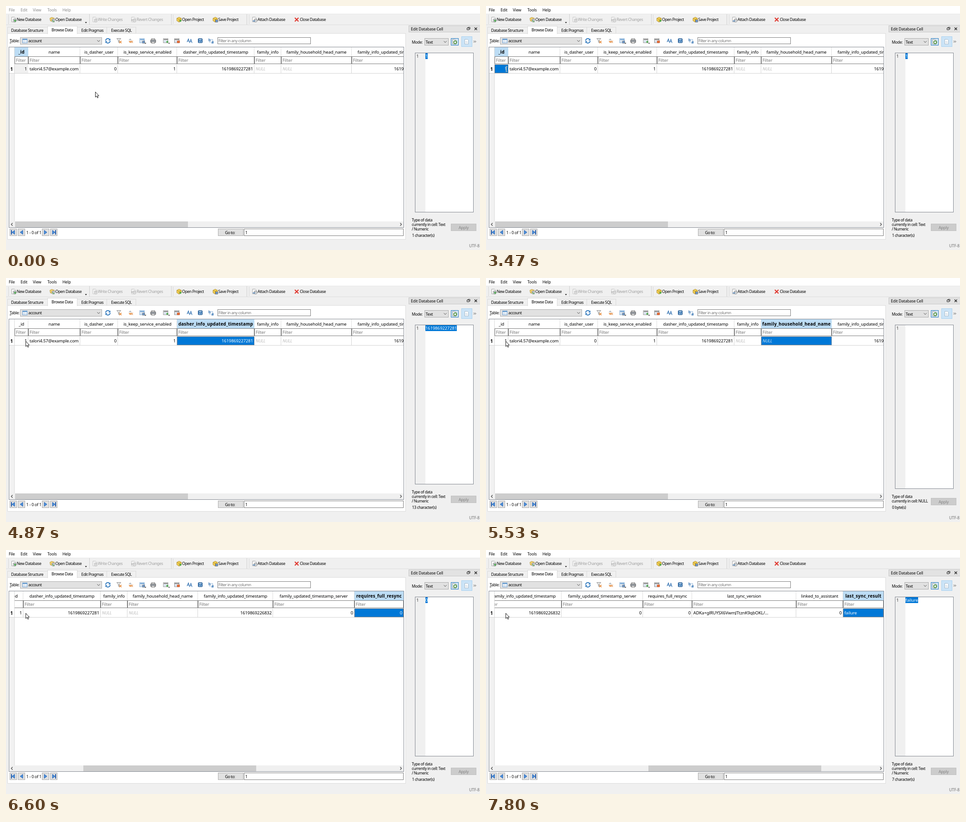
An HTML page that plays this animation: 1042x538 px, repeating every 8000 ms.

```html
<!DOCTYPE html>
<html lang="en">
<head>
<meta charset="utf-8">
<title>Database table browser</title>
<style>
  html, body { margin: 0; width: 100%; height: 100%; overflow: hidden; background: #f0f0f0; }
  svg { display: block; width: 1042px; height: 538px; }
  text { font-family: "Noto Sans", "Open Sans", sans-serif; white-space: pre; }
  .ui { font-size: 8.8px; letter-spacing: -.48px; }
  .title { font-size: 8.8px; letter-spacing: -.2px; }
  .cell { font-size: 9.5px; letter-spacing: -.12px; }
  .bold { font-size: 9.7px; letter-spacing: .22px; font-weight: 700; }
  .null { font-size: 9.2px; letter-spacing: -.12px; font-style: italic; }
</style>
</head>
<body>
<svg id="stage" viewBox="0 0 1042 538" xmlns="http://www.w3.org/2000/svg">
  <defs><clipPath id="view"><rect x="19" y="91" width="855" height="384"/></clipPath></defs>
  <g id="chrome"></g><g id="menu"></g><g id="grid"></g><g id="dock"></g><g id="pointer"></g>
</svg>
<script>
const $ = id => document.getElementById(id);
const BLUE = '#0078d7', GREY = '#757575', EDGE = '#828790', HEAD = '#bcdcf4';

const fill = (x, y, w, h, c) =>
  `<rect x="${x}" y="${y}" width="${w}" height="${h}" fill="${c}" shape-rendering="crispEdges"/>`;
const box = (x, y, w, h, c, edge, extra = '') =>
  `<rect x="${x + .5}" y="${y + .5}" width="${w - 1}" height="${h - 1}" fill="${c}" stroke="${edge}" ${extra}/>`;
const path = (d, c = 'none', line = 'none', width = 1) =>
  `<path d="${d}" fill="${c}" stroke="${line}" stroke-width="${width}"/>`;
const label = (s, x, y, c = '#000', cls = 'ui', anchor = 'start') =>
  `<text x="${x}" y="${y}" fill="${c}" class="${cls}" text-anchor="${anchor}">${s}</text>`;
const at = (x, y, s) => `<g transform="translate(${x} ${y})">${s}</g>`;
const chevron = (x, y) => path(`M${x} ${y}l3 3 3-3`, 'none', '#444');

// Icons, drawn in a 12 px box
const sheet = (edge, c) => path('M1.5 .5h6l2 2v8.500h-8z', c, edge, .8);
const drum = (c, edge) => path('M5 5.500v4.500c0 2 6 2 6 0v-4.500c0-2-6-2-6 0c0 1.600 6 1.600 6 0', c, edge, .7);
const folder = path('M.5 3l4-2 6 2-2 7-7-1z', '#f3d36b', '#b08a25', .8);
const cube = path('M6 .6l5 2.500v5.500l-5 3-5-3v-5.500z', '#f2cf52', '#a8862a', .8) +
  path('M1 3l5 2.500 5-2.500M6 5.500v6', 'none', '#a8862a', .7);
const plus = path('M9 6v5M6.500 8.500h5', 'none', '#3fa33f', 1.6);
const table = (c = '#6d9fd0') => box(0, 1, 11, 10, '#fff', c) + fill(1, 2, 9, 2, c) +
  path('M1 6.500h9M1 8.500h9M4 4v6', 'none', '#b8cfe6', .8);
const badge = c => box(6, 6, 6, 6, c, '#555', 'stroke-width=".7"');
const drop = path('M11 11h4l-2 2z', '#222');

function drawChrome() {
  let s = fill(0, 0, 1042, 538, '#f0f0f0') + fill(0, 0, 1042, 17, '#fff') +
    fill(0, 17, 1042, 1, '#e6e6e6') + fill(0, 41, 1042, 1, '#dcdcdc');

  for (const x of [5, 367, 534])
    for (let y = 20; y < 40; y += 3) s += fill(x, y, 1, 1, '#a8a8a8');
  for (const x of [183, 363, 529]) s += fill(x, 18, 1, 23, '#cfcfcf');

  const tools = [
    ['New Database', 23.500, sheet('#909090', '#fff') + drum('#d5d9dc', '#777') + plus],
    ['Open Database', 108.500, folder + drum('#d5d9dc', '#777') + path('M6 8l4 3', 'none', '#3fa33f', 1.4)],
    ['Write Changes', 202, sheet('#bbb', '#f4f4f4') + drum('#ddd', '#b0b0b0'), 1],
    ['Revert Changes', 287, sheet('#bbb', '#f4f4f4') + drum('#ddd', '#b0b0b0') + path('M5 7H1l2-2M1 7l2 2', 'none', '#aaa'), 1],
    ['Open Project', 387, cube + plus],
    ['Save Project', 466.500, cube + badge('#6f9bd0')],
    ['Attach Database', 553, sheet('#909090', '#fff') + drum('#d5d9dc', '#777') + path('M2 9h5', 'none', '#3b79b8', 1.6)],
    ['Close Database', 646, path('M1.500 2l8 8M9.500 2l-8 8', 'none', '#e03a32', 2.4)]
  ];
  for (const [name, x, icon, off] of tools)
    s += at(x - 12.500, 24, icon) + label(name, x, 33, off ? '#a0a0a0' : '#000');
  s += path('M173.500 35.500h4.500l-2.200 2.500z', '#111');

  // Tabs and page
  s += box(3, 60, 876, 455, '#fff', '#dcdcdc');
  for (const [x, w] of [[3, 89], [156, 66], [221, 65]]) s += box(x, 46, w, 15, '#f0f0f0', '#d9d9d9');
  s += box(91, 44, 66, 18, '#fff', '#d9d9d9') + fill(92, 60, 64, 3, '#fff');
  s += label('Database Structure', 11, 57) + label('Browse Data', 100, 56) +
    label('Edit Pragmas', 165.500, 57) + label('Execute SQL', 231, 57);

  s += label('<tspan text-decoration="underline">T</tspan>able:', 8, 80) +
    box(31, 69, 180, 16, '#e1e1e1', '#adadad') + at(36, 71, table()) + label('account', 49, 80) + chevron(200.500, 75.500);

  const funnel = path('M.5 1h9l-3.500 4.500v5l-2-1.500v-3.500z', '#e8e8e8', '#777', .8);
  const icons = [
    [218, path('M1 6a5 5 0 0 1 8.500-3.200M11 6.500a5 5 0 0 1-8.500 3.200', 'none', '#2f78bd', 1.9) +
      path('M11.500 1v4.500h-4.500zM.5 11.500v-4.500h4.500z', '#2f78bd')],
    [243, funnel + path('M6 6.500l5 5M11 6.500l-5 5', 'none', '#e58a3a', 1.6)],
    [268, path('M1.500 5l3.500-4 3.500 4z', '#b9bec3') + path('M1.500 7l3.500 4 3.500-4z', '#e58a3a') +
      path('M7 6l4 5M11 6l-4 5', 'none', '#dd8740', 1.1)],
    [293.500, table() + badge('#6f9bd0') + drop],
    [317.500, box(2, 1, 8, 4, '#fff', '#666') + box(0, 4, 12, 6, '#a3aab1', '#555') + box(2, 8, 8, 4, '#fff', '#666')],
    [345.500, table('#888') + plus + drop],
    [370, table('#888') + box(6, 6, 6, 5, '#f0763a', '#c44c20')],
    [397.500, path('M.5 9l3-7 2 7M1.500 7h4M6 11l3-8 2.500 8M7 8h4', 'none', '#2f6fb0', 1.2)],
    [421, box(1, 1, 10, 10, '#3476b4', '#1f5288', 'rx="1"') + path('M3 4h6M3 8.500h2.500M7 8.500h2', 'none', '#fff', 1.5)],
    [444.500, path('M1.500 1v5.500h3v-3h-3M8 7.500h3v4h-3v-2.200h3', 'none', '#2f6fb0', 1.2) +
      path('M6 3.500h4v2.500M2 9h3.500', 'none', '#8ab0d5', 1)]
  ];
  for (const [x, icon] of icons) s += at(x, 70.500, icon);
  s += box(465, 69, 205, 15, '#fff', '#7a7a7a') + label('Filter in any column', 467, 80, GREY);

  // Paging row
  [[8, -1, 1], [26, -1], [79, 1], [97, 1, 1]].forEach(([x, dir, end]) => {
    const c = x + 8;
    s += box(x, 491, 16, 16, '#e1e1e1', '#adadad') +
      path(`M${c + 3 * dir} 499l${-6 * dir}-4.500v9z`, '#4a90dd', '#1f58a8', .8);
    if (end) s += fill(c + 4 * dir - 1, 494, 2, 10, '#1f58a8');
  });
  s += label('1 - 0 of 1', 44.500, 503, '#000', 'title') + box(466, 491, 56, 16, '#e1e1e1', '#adadad') +
    label('Go to:', 481.500, 503) + box(523, 491, 351, 16, '#fff', '#7a7a7a') + label('1', 526, 502.500);
  s += label('UTF-8', 1018, 532, '#6d6d6d', 'title');

  // Side panel head
  s += box(885, 43, 160, 15, '#e2e2e2', '#c6c6c6') + label('Edit Database Cell', 890, 54, '#000', 'title') +
    path('M1015.500 48.500v-1.500h4.500v4h-1.500M1013.500 48.500h4.500v4h-4.500z', 'none', '#222') +
    path('M1030 47.500l5.500 5.500M1035.500 47.500l-5.500 5.500', 'none', '#222', 1.4);
  s += label('Mode:', 892, 83) + box(920, 71, 53, 16, '#e1e1e1', '#adadad') + label('Text', 922.500, 82.500, '#000', 'title') +
    chevron(962.500, 77.500);
  s += box(978, 71, 17, 16, '#d5e7f5', '#2b7cc0') + at(980, 73, sheet('#77848f', '#eef2f5') +
    '<circle cx="7.500" cy="7" r="3.200" fill="none" stroke="#5d9a48" stroke-width="2"/>');
  s += box(1001, 67, 24, 23, '#cce4f7', '#a9d1f0') + at(1007, 73, sheet('#93a9bd', '#fff') +
    path('M3 4.500h4M3 6.500h5M3 8.500h5', 'none', '#c3d0dc', .8));
  s += path('M1028 76.500l2 2-2 2M1031 76.500l2 2-2 2', 'none', '#333', .9);
  $('chrome').innerHTML = s;
}

// Column name, right edge, value, left aligned
const columns = [
  ['_id', 49, '1'],
  ['name', 163, 'talori4.57@example.com', 1],
  ['is_dasher_user', 246, '0'],
  ['is_keep_service_enabled', 376, '1'],
  ['dasher_info_updated_timestamp', 546, '1619869227281'],
  ['family_info', 605, null],
  ['family_household_head_name', 760, null],
  ['family_info_updated_timestamp', 925, '1619869226832'],
  ['family_updated_timestamp_server', 1104, '0'],
  ['requires_full_resync', 1212, '0'],
  ['last_sync_version', 1441, 'ADKa+glRUYSX6VwmJTtznK9qbOKL/zTRKUp6i77FsCk=', 1],
  ['linked_to_assistant', 1544, '0'],
  ['last_sync_result', 1633, 'failure', 1]
];
const LEFT = 19, RIGHT = 874, TOTAL = 1894;

function drawGrid(col, active, edit) {
  const scroll = Math.max(0, columns[col][1] - RIGHT);
  let cells = '', x0 = LEFT - scroll;
  columns.forEach(([name, right, value, left], i) => {
    const x1 = right - scroll, w = x1 - x0, on = i === col, lit = on && active;
    if (x1 > LEFT && x0 < RIGHT) {
      cells += fill(x1 - 1, 91, 1, 20, '#dedede') + fill(x1 - 1, 129, 1, 20, '#d4d4d4') + fill(x0, 148, w, 1, '#d4d4d4');
      if (on) cells += fill(x0, 91, w, 20, HEAD) + fill(x0, 129, w, 19, active ? BLUE : '#f0f0f0');
      if (lit) cells += box(x0, 129, w, 19, 'none', '#5d7d99');
      cells += label(name, (x0 + x1) / 2, 105.300, '#000', on ? 'bold' : 'cell', 'middle') +
        box(x0, 111, w, 17, '#fff', '#7a7a7a') + label('Filter', x0 + 2.700, 122.600, GREY, 'cell');
      const ink = lit ? '#fff' : '#000';
      if (value === null) cells += label('NULL', x0 + 3, 142.300, lit ? '#d6e8f7' : '#b8b8b8', 'null');
      else if (!(on && edit)) {
        const shown = value.length > 40 ? value.slice(0, 29) + '...' : value;
        cells += left ? label(shown, x0 + 2.700, 142.300, ink, 'cell')
          : label(shown, x1 - 3, 142.300, ink, 'cell', 'end');
      }
    }
    x0 = x1;
  });
  if (edit) {
    cells += box(19, 129, 30, 19, '#fff', BLUE);
    if (edit.marked) cells += fill(21, 133, 6, 12, BLUE);
    cells += label('1', 21.700, 142.300, edit.marked ? '#fff' : '#000', 'cell');
    if (edit.caret) cells += fill(27, 133, 1, 12, '#000');
  }
  const thumb = 20 + scroll / (TOTAL - 855) * 462;
  $('grid').innerHTML = box(6, 90, 869, 399, '#fff', EDGE) +
    fill(7, 149, 11, 326, '#f2f2f2') + fill(18, 91, 1, 384, '#d9d9d9') + fill(7, 148, 12, 1, '#d4d4d4') +
    label('1', 9.500, 142.500, '#000', 'bold') + `<g clip-path="url(#view)">${cells}</g>` +
    fill(7, 475, 867, 13, '#f0f0f0') + fill(Math.round(thumb), 475, 380, 13, '#cdcdcd') +
    path('M14.500 478.500l-3 3 3 3M866.500 478.500l3 3-3 3', 'none', '#444', 1.3);
}

function drawDock(value) {
  const none = value === null, text = value || '', n = text.length;
  const cuts = n > 40 ? [0, 17, 35, n] : n > 20 ? [0, n - 1, n] : [0, n];
  const bottom = none ? 465 : 455;
  let s = box(899, 103, 129, bottom - 103, '#fff', EDGE) + fill(900, 104, 22, bottom - 105, '#f0f0f0') +
    label('1', 902, 114.300, '#333', 'cell');
  $('dock').innerHTML = s;
  for (let i = 0; n && i < cuts.length - 1; i++) {
    const y = 104 + i * 13, line = text.slice(cuts[i], cuts[i + 1]);
    $('dock').insertAdjacentHTML('beforeend', label(line, 922, y + 10.300, '#fff', 'cell'));
    const ink = $('dock').lastElementChild;
    ink.insertAdjacentHTML('beforebegin', fill(922, y, Math.round(ink.getComputedTextLength()), 13, BLUE));
    if (i < cuts.length - 2) $('dock').insertAdjacentHTML('beforeend',
      path(`M1022.500 ${y + 4}h4v4h-4M1024.500 ${y + 6}l-2 2 2 2`, 'none', '#333', .9));
  }
  const lines = none ? ['Type of data', 'currently in cell: NULL'] : ['Type of data', 'currently in cell: Text', '/ Numeric'];
  const y = none ? 485 : 475, button = none ? 485 : 480;
  s = lines.map((l, i) => label(l, 892, y + i * 10)).join('') +
    label(none ? '0 byte(s)' : n + ' character(s)', 892.500, 509) +
    box(978, button, 56, 16, '#cccccc', '#bfbfbf') + label('Apply', 1006, button + 12, '#838383', 'title', 'middle');
  $('dock').insertAdjacentHTML('beforeend', s);
}

function drawMenu(active) {
  $('menu').innerHTML = [['File', 6], ['Edit', 32], ['View', 59], ['Tools', 91], ['Help', 124]]
    .map(([s, x]) => label(s, x, 11.500, active ? '#000' : '#8a8a8a', 'title')).join('');
}

const arrow = path('M.5 .5V12l2.700-2.400 1.800 4.100 1.700-.7-1.800-4h3.400z', '#fff', '#000', .9);
const beam = c => path('M-2 -5.500h1.500l.5.500.5-.5h1.500M0-5v10M-2 5.500h1.500l.5-.5.5.5h1.500', 'none', c, .9);

// Start time, selected column, cell editor
const steps = [
  [0, 0], [1130, 0], [1800, 0], [1870, 0, { marked: 1, caret: 1 }], [2330, 0, { marked: 1 }],
  [2530, 0, { caret: 1 }], [3200, 0, {}], [3470, 0], [3530, 0],
  [3730, 1], [4200, 2], [4600, 3], [4870, 4], [5200, 5], [5530, 6],
  [5930, 7], [6270, 8], [6600, 9], [7000, 10], [7400, 11], [7800, 12]
];

function drawPointer(t, edit) {
  if (t >= 1800 && t < 3530) {
    $('pointer').innerHTML = at(45, 139, beam(edit ? '#000' : '#ffd9a8'));
    return;
  }
  const k = t < 70 ? 0 : Math.min(10, Math.floor((t - 70) / 66.600) + 1) / 10;
  const e = k * k * (3 - 2 * k);
  $('pointer').innerHTML = at(Math.round(196 - 153 * e), Math.round(189 - 50 * e), arrow);
}

let shown = -1;
const start = performance.now();
function tick() {
  const t = (performance.now() - start) % 8000;
  let i = steps.length - 1;
  while (steps[i][0] > t) i--;
  const [, col, edit] = steps[i];
  if (i !== shown) {
    shown = i;
    drawMenu(i > 0);
    drawGrid(col, i > 0, edit);
    drawDock(columns[col][2]);
  }
  drawPointer(t, edit);
  requestAnimationFrame(tick);
}
drawChrome();
tick();
</script>
</body>
</html>
```
